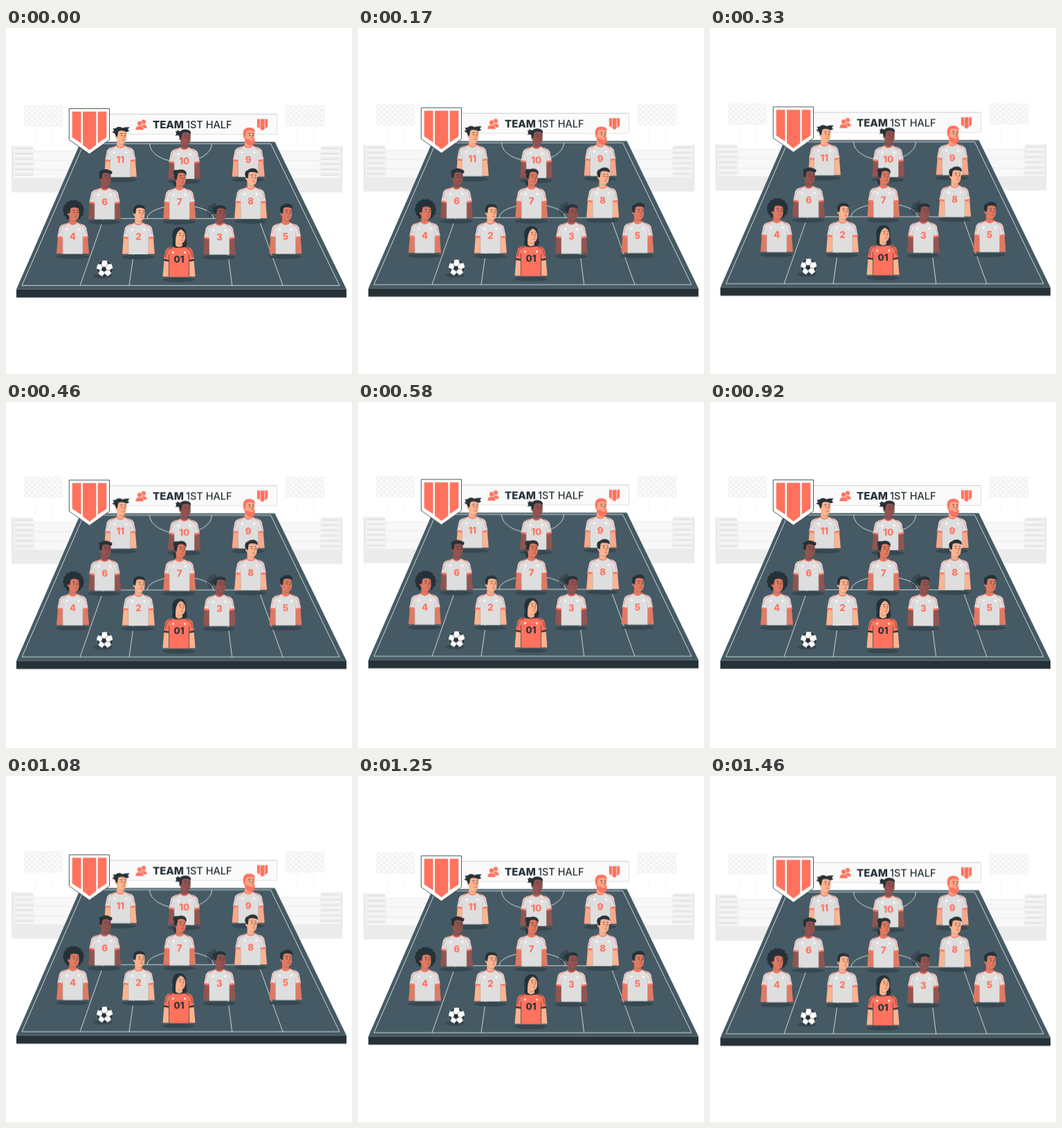
These frames come from a looping animation (500x500 px, 1500 ms). An HTML page:

```html
<!DOCTYPE html>
<html lang="en">
<head>
<meta charset="utf-8">
<title>Team line-up</title>
<style>
  html, body { margin: 0; width: 100%; height: 100%; overflow: hidden; background: #fff; }
  svg { display: block; width: 100vw; height: 100vh; }
  #scene { animation: float 1.5s linear -41.67ms infinite; }
  @keyframes float {
    0%, 100% { transform: translateY(0); }
    50% { transform: translateY(-6.2px); }
  }
  text { font-family: Inter, Roboto, sans-serif; }
  .num { font-size: 13.2px; font-weight: 800; text-anchor: middle; }
  .lines { fill: none; stroke: #fff; stroke-width: .75; }
</style>
</head>
<body>
<svg viewBox="0 0 500 500">
  <g id="scene">
    <g id="stadium"></g>

    <rect x="148" y="125" width="243.5" height="29" fill="#fafafa" stroke="#dadada" stroke-width=".8"/>
    <path d="M148 125H391" stroke="#b5bbbe" stroke-width=".5"/>

    <path d="M108 165H388.5L492 378H15Z" fill="#455a64"/>
    <path d="M15 378H492V390.1H15Z" fill="#263238"/>
    <g class="lines">
      <path d="M112.5 167.6H382.5L482 372.6H23Z"/>
      <path d="M207.5 167.6A45 26.5 0 0 0 297.5 167.6"/>
      <path d="M107 372.6L141 275.8H365L400 372.6"/>
      <path d="M204 275.8A48 19 0 0 1 300 275.8"/>
      <path d="M178 372.6L185.5 320M326.7 372.6L320 320"/>
    </g>

    <path d="M91.3 117H149.5V162L120.5 182.6L91.3 162Z" fill="#fff" stroke="#37474f" stroke-width=".9"/>
    <g id="crest" fill="#ff725e">
      <path d="M95.7 121.3H108.5V167L95.7 158.5Z"/>
      <path d="M111 121.3H130.3V169.5L120.6 177L111 169.5Z"/>
      <path d="M132.7 121.3H145.3V158.5L132.7 167Z"/>
    </g>
    <use href="#crest" transform="translate(333.2 95.6) scale(.31 .3)"/>

    <g fill="#ff725e" stroke="#fafafa" stroke-width=".7">
      <path d="M192 145Q193 139.8 198.6 139.8T204 145.5H193Z"/>
      <circle cx="198.800" cy="136.200" r="3.600"/>
      <path d="M187 148Q187 141.6 193 141.6T199 148Z"/>
      <circle cx="193.200" cy="138.400" r="3.700"/>
    </g>
    <text x="212" y="145.400" font-size="15" font-weight="800" fill="#263238">TEAM</text>
    <text x="260" y="145.400" font-size="14.500" font-weight="500" fill="#263238">1ST HALF</text>

    <g id="players"></g>

    <ellipse cx="140" cy="359" rx="13.500" ry="3.200" fill="#37474f"/>
    <g id="ball" transform="translate(142.600 348)"></g>
  </g>
</svg>
<script>
const ink = '#263238', coral = '#ff725e';
const light = '#ffb38f', rosy = '#fca688', tan = '#df7a63', brown = '#935450';

const path = (d, fill, extra = '') => `<path d="${d}" fill="${fill}" ${extra}/>`;
const line = (d, color, w) =>
  path(d, 'none', `stroke="${color}" stroke-width="${w}" stroke-linecap="round"`);
const dot = (x, y, r, fill) => `<circle cx="${x}" cy="${y}" r="${r}" fill="${fill}"/>`;
const range = n => [...Array(n).keys()];
const fill = (id, html) => document.getElementById(id).innerHTML = html;

// Stadium
function lamps(x) {
  let s = path(`M${x + 16} 143V171M${x + 41} 143V171`, 'none', 'stroke="#f8f8f8" stroke-width="1.2"');
  for (const r of range(4)) for (const c of range(7))
    s += `<circle cx="${x + 3.8 + c * 8.1}" cy="${115.8 + r * 7.7}" r="3.5" fill="#fafafa" stroke="#e8e8e8" stroke-width=".8"/>`;
  return s;
}
function stand() {
  let s = path('M8 171H38L41 178V218H8Z', '#f2f2f2') + path('M8 217.5H110V238H8Z', '#ebebeb');
  for (const i of range(6)) {
    const y = 173 + i * 7.6;
    s += path(`M13 ${y}H39V${y + 3.4}H13Z`, '#e6e6e6') +
         path(`M13 ${y + 3.4}H39V${y + 5}H13Z`, '#fafafa');
  }
  return s + path('M8 171H11V218H8Z', '#e9e9e9');
}
fill('stadium',
  path('M39 178H456V218H39Z', '#f8f8f8') +
  path('M39 178.5H456M39 191.5H456M39 205.5H456', 'none', 'stroke="#e6e6e6" stroke-width=".8"') +
  lamps(26) + lamps(404) + stand() +
  `<g transform="translate(494.300 0) scale(-1 1)">${stand()}</g>`);

// Hair: pieces behind and in front of the head, relative to its centre
const cap = 'M-8 0C-10 -8 -6 -12.5 0 -12.5C6 -13 9.5 -9 8.2 -5.5C5 -9 0 -9 -4 -7L-5.5 1Z';
const curls = (r, size, n, y) => range(n).map(i => {
  const a = i / n * 2 * Math.PI;
  return dot((r * Math.cos(a)).toFixed(1), (y + r * Math.sin(a)).toFixed(1), size, ink);
}).join('');

const hair = {
  slick: () => ['', path(cap, ink)],
  messy: () => ['', path('M-7.5 0L-9 -4L-13 -6L-10 -8L-12 -11L-8 -11.5Q-3 -16 2 -12Q7 -14 12.5 -13L9.5 -10L12 -8L8 -6Q1 -10 -4 -7L-5.5 1Z', ink)],
  quiff: () => ['', path('M-7.5 0C-11 -5 -9 -11 -5 -11C-2 -15.5 11 -15 9 -6C5 -9 -1 -9 -4 -7L-5 1Z', ink)],
  curly: () => ['', path(cap, ink) + range(6).map(i =>
    dot(-6.5 + i * 2.8, -8 - 3 * Math.sin((i + .5) / 6 * Math.PI), 2.5, ink)).join('')],
  afro: () => [dot(-1, -4, 13, ink) + curls(12, 3.4, 14, -4), path(cap, ink)],
  wavy: () => [path('M-7 -8C-11 -3 -8 3 -9.5 8C-9 13 -4 13 -3 9L0 -8Z', ink) + dot(-6, -8.5, 4, ink),
    path('M-7.5 2C-10 -8 -5 -13 0 -13C8 -14 10.5 -8 8.5 -4C7 -8 2 -10 -3 -7.5L-5.5 3Z', ink)],
  long: () => [path('M-5 -12C7 -16 11 -6 9 1C9 7 13 12 8 16L-4 17C-12 17 -11 11 -10 5C-12 -3 -10 -10 -5 -12Z', ink),
    path('M-8 7C-11 -6 -7 -13 0 -13C7 -13 9.5 -7 8.5 -2C7 -6 4 -9 1 -9.5C-2 -7 -5 -5 -6 6Z', ink)],
  bun: () => [dot(-9.5, -7, 3.4, ink) + line('M-9 -7L-13 -9M-9 -7L-13 -4M-9 -7L-11 -11', ink, 1.4), path(cap, ink)],
  dreads: () => [range(8).map(i => {
    const a = 2.5 + i * .3, c = Math.cos(a), s = Math.sin(a);
    return line(`M-5 -5Q${-6 + 8 * c} ${-6 + 8 * s} ${-5 + 13.5 * c} ${-4 + 12 * s}`, ink, 1.1);
  }).join(''), path(cap, ink)],
  ginger: () => ['', path(cap, coral) +
    path('M-7 0L-4.5 4Q2 6 8 3L8.5 6Q8 13.5 2 13.5Q-6 13 -7 0Z', coral) + line('M2 5.5H5', '#fff', .9)]
};

function head(skin, style) {
  const [back, front] = hair[style]();
  return back +
    path('M-6 2H4V15Q-1 19 -6 15Z', skin) +
    path('M-6 8Q-1 13 4 10V12Q-1 14 -6 8Z', ink, 'opacity=".18"') +
    path('M-7 -5Q-6 -11 1 -11Q8 -11 8 -4V3Q7 10 2.5 10Q-4 10 -6.5 4Z', skin) +
    dot(-6.3, 1, 2.3, skin) +
    dot(1, -1, .8, ink) + dot(6, -1, .8, ink) +
    line('M-.8 -3.8L2 -4.2M5 -4.2L7.5 -3.6', ink, .7) +
    line('M4 -.5L5 2.5H3.6', '#6f3833', .5) +
    line('M2 5.5Q3.6 6.6 5.2 5.5', '#6f3833', .6) +
    front;
}

function player([num, x, y, skin, style]) {
  const keeper = num === '01';
  const shirt = keeper ? coral : '#dedede', trim = keeper ? ink : coral;
  const side = sx => `<g transform="scale(${sx} 1)">` +
    path('M14 -25L21.5 -25L23.5 -.5H14.5Z', skin) +
    path('M5 -45Q18 -43 19.5 -38L22.3 -24L14 -22.5Z', shirt) +
    path('M21.9 -26L22.5 -23.6L14 -22V-24.4Z', trim) +
    line('M6.5 -44.8Q16 -42 18 -36L19.5 -29', trim, .65) +
    line('M14.4 -32V-1', keeper ? ink : '#a9abac', keeper ? 1 : .7) +
    dot(8.5, -35.5, 1.5, '#fff') + '</g>';
  return `<g transform="translate(${x} ${y})">` +
    '<ellipse cx="-.5" cy="4" rx="23.500" ry="3.300" fill="#37474f"/>' +
    side(-1) + side(1) +
    path('M-6 -45.5H7L14.3 -38V0H-14.3V-38Z', shirt) +
    dot(-8.5, -35.5, 1.5, '#fff') + dot(8.5, -35.5, 1.5, '#fff') +
    line('M-6.5 -45L-13 -40M7.5 -45L13.5 -40', trim, .6) +
    `<g transform="translate(1 -59)">${head(skin, style)}</g>` +
    line('M-6 -45.5Q0 -39.5 6.5 -45.5', trim, 1.3) +
    `<text class="num" y="-20.800" fill="${trim}">${num}</text></g>`;
}

// Number, x, waist y, skin, hair
fill('players', [
  ['11', 165.3, 216, light, 'messy'],
  ['10', 257.7, 218.5, brown, 'bun'],
  ['9', 350.2, 215.8, rosy, 'ginger'],
  ['6', 142.5, 277, brown, 'curly'],
  ['7', 250.7, 277, tan, 'wavy'],
  ['8', 353.6, 276, light, 'quiff'],
  ['4', 96.5, 327, tan, 'afro'],
  ['2', 191.4, 327.5, light, 'slick'],
  ['3', 308.3, 328, brown, 'dreads'],
  ['5', 404, 327, tan, 'quiff'],
  ['01', 250, 360.3, light, 'long']
].map(player).join(''));

// Ball: one central patch and five at the rim
const patch = (x, y, r, turn) => path('M' + range(5).map(i => {
  const a = turn + i * 2 * Math.PI / 5;
  return `${(x + r * Math.cos(a)).toFixed(1)} ${(y + r * Math.sin(a)).toFixed(1)}`;
}).join('L') + 'Z', ink);
fill('ball', '<clipPath id="disc"><circle r="11.500"/></clipPath>' + dot(0, 0, 11.5, '#fff') +
  '<g clip-path="url(#disc)">' + patch(-1, 1, 4, .3) + range(5).map(i => {
    const a = .3 + i * 2 * Math.PI / 5, c = Math.cos(a), s = Math.sin(a);
    return line(`M${-1 + 4 * c} ${1 + 4 * s}L${9 * c} ${9 * s}`, ink, .5) + patch(11 * c, 11 * s, 3.3, a + Math.PI);
  }).join('') + '</g>');
</script>
</body>
</html>
```
